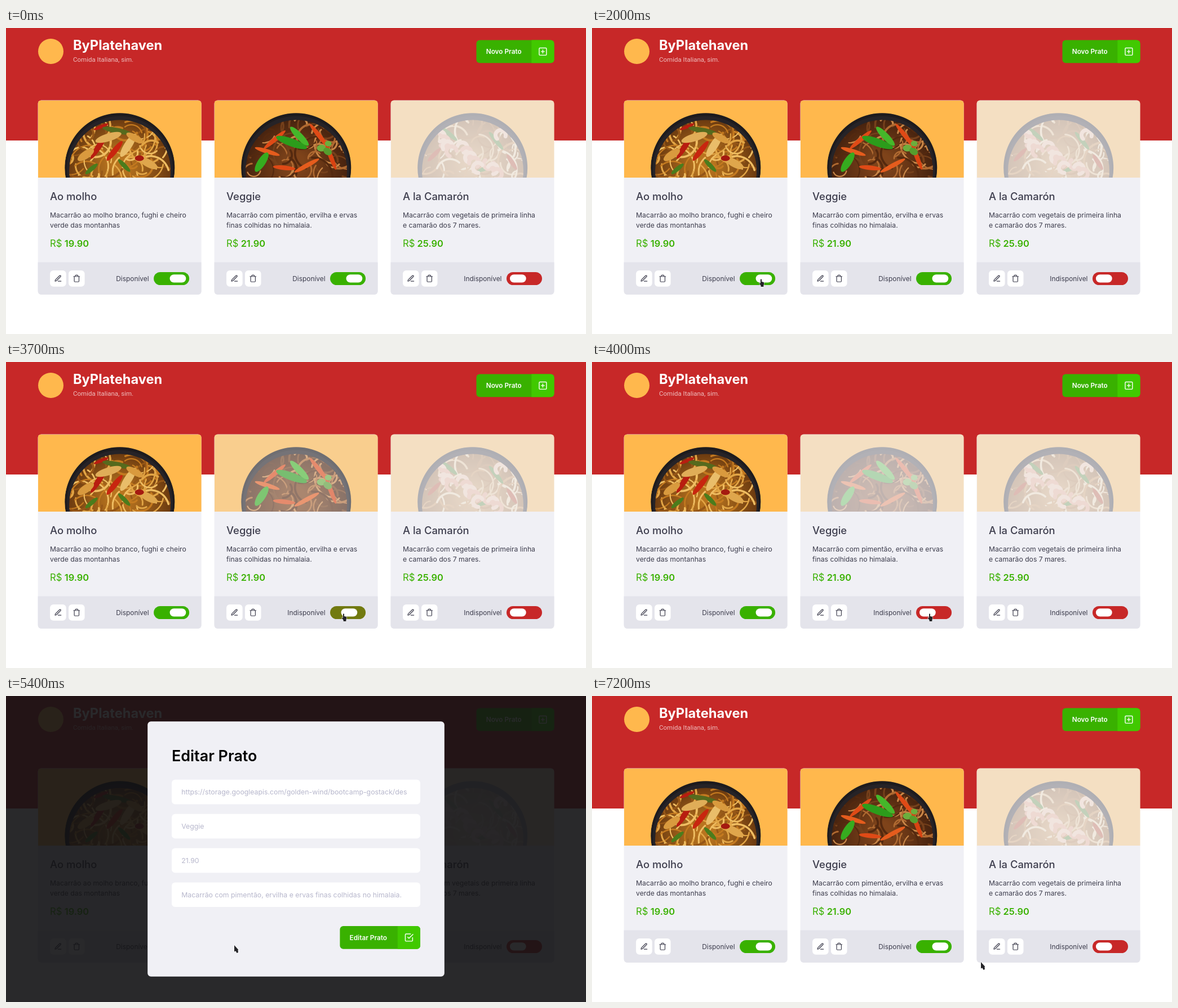
Animation, 1029 px wide and 544 px high, one loop 8000 ms. Source, as an HTML page with a canvas:

```html
<!DOCTYPE html>
<html lang="pt-BR">
<head>
<meta charset="utf-8">
<title>Comida Italiana</title>
<style>
  html, body { margin: 0; width: 100%; height: 100%; overflow: hidden; background: #fff; }
  canvas { display: block; width: 1029px; height: 544px; }
</style>
</head>
<body>
<canvas id="stage"></canvas>
<script>
const W = 1029, H = 544, LOOP = 8000, STEP = 100;
const CARD_W = 290, CARD_GAP = 312.95, CARD_TOP = 128.5, PHOTO_H = 137.5;
const RED = '#c72828', GREEN = '#39b100', LIME = '#41c900', AMBER = '#ffb84d';
const INK = '#3d3d4d', PAPER = '#f0f0f5', FOOT = '#e4e4eb', HINT = '#b7b7cc';
const MODAL_OPEN = 5300, MODAL_CLOSE = 7000;

const canvas = document.getElementById('stage');
const ctx = canvas.getContext('2d');
const dpr = window.devicePixelRatio || 1;
canvas.width = W * dpr;
canvas.height = H * dpr;

const clamp = v => Math.max(0, Math.min(1, v));
const mix = (a, b, p) => a + (b - a) * p;

const icon = {
  edit: new Path2D('M12 20h9M16.5 3.5a2.12 2.12 0 0 1 3 3L7 19l-4 1 1-4z'),
  trash: new Path2D('M3 6h18M19 6v14a2 2 0 0 1-2 2H7a2 2 0 0 1-2-2V6m3 0V4a2 2 0 0 1 2-2h4a2 2 0 0 1 2 2v2'),
  plus: new Path2D('M5 3h14a2 2 0 0 1 2 2v14a2 2 0 0 1-2 2H5a2 2 0 0 1-2-2V5a2 2 0 0 1 2-2zM12 8v8M8 12h8'),
  check: new Path2D('M9 11l3 3L22 4M21 12v7a2 2 0 0 1-2 2H5a2 2 0 0 1-2-2V5a2 2 0 0 1 2-2h11')
};

const pointer = {
  arrow: new Path2D('M0 0V11.5L2.4 10.2 4.6 14 7 12.8 6.4 8.8 7.4 8.2z'),
  hand: new Path2D('M2 1.2Q3 -.6 4 1.2V5L7.2 5.8Q8.6 6.4 8.2 9L7.4 11.5V14H2.6V12L.2 8.8Q-.4 7 1 7.2L2 8z'),
  beam: new Path2D('M1 1H3.5V12H1M6 1H3.5V12H6')
};

// Pieces: x, y, half length, half width, angle, colour
const dishes = [
  {
    name: 'Ao molho', price: '19.90',
    lines: ['Macarrão ao molho branco, fughi e cheiro', 'verde das montanhas'],
    base: ['#b8741f', '#6b3a10'], noodles: ['#e2a545', '#c47a20', '#955617', '#efbd62'],
    pieces: [
      [108, 82, 26, 5, -1, '#b81d10'], [136, 90, 22, 5, -.9, '#c8260f'], [112, 47, 14, 3, -.4, '#b81d10'],
      [140, 54, 26, 5, .2, '#566a1d'], [125, 66, 24, 7, -.3, '#e0ad58'], [160, 80, 24, 7, -1, '#e9bd6a'],
      [172, 67, 17, 6, .5, '#d99a3e'], [85, 97, 17, 7, -.6, '#d99a3e'], [196, 112, 18, 7, .5, '#dfa64c'],
      [153, 116, 15, 4, .8, '#4b7c1c'], [95, 122, 14, 4, -.7, '#4b7c1c'], [180, 103, 8, 5, 0, '#a51a10']
    ]
  },
  {
    name: 'Veggie', price: '21.90',
    lines: ['Macarrão com pimentão, ervilha e ervas', 'finas colhidas no himalaia.'],
    base: ['#7e431a', '#47230f'], noodles: ['#b06a31', '#75401b', '#c98748', '#54290f'],
    pieces: [
      [107, 70, 25, 4, -.7, '#df4a16'], [186, 63, 27, 4, .9, '#df4a16'], [94, 91, 23, 4, .3, '#e55c1d'],
      [164, 116, 25, 4, -.5, '#e55c1d'], [207, 101, 24, 4, 1.2, '#d94312'], [124, 120, 20, 4, .1, '#df4a16'],
      [137, 75, 29, 7, .35, '#2c9c1b'], [151, 64, 23, 6, .8, '#45b72a'], [84, 110, 20, 7, -1, '#36ab1f'],
      [190, 85, 8, 6, 0, '#6cae3d'], [201, 91, 8, 6, .6, '#569c2d'], [202, 77, 6, 5, 0, '#6cae3d']
    ]
  },
  {
    name: 'A la Camarón', price: '25.90',
    lines: ['Macarrão com vegetais de primeira linha', 'e camarão dos 7 mares.'],
    base: ['#cf9c5c', '#96642f'], noodles: ['#ecc78f', '#cd9654', '#f3dcb0', '#b27b40'],
    pieces: [
      [104, 60, 18, 4, .7, '#5d8a35'], [187, 72, 20, 4, .9, '#5d8a35'], [77, 97, 16, 4, -.8, '#b74a25'],
      [170, 120, 18, 4, -.4, '#5d8a35'], [215, 110, 16, 4, 1, '#b74a25']
    ],
    shrimps: 14
  }
];

function randomizer(seed) {
  return () => (seed = seed * 16807 % 2147483647) / 2147483647;
}

function paintPhoto(dish, seed) {
  const c = document.createElement('canvas');
  const scale = 2 * dpr, rnd = randomizer(seed);
  c.width = CARD_W * scale;
  c.height = Math.ceil(PHOTO_H * scale);
  const g = c.getContext('2d');
  const disc = (x, y, r, fill) => {
    g.beginPath();
    g.arc(x, y, r, 0, 7);
    g.fillStyle = fill;
    g.fill();
  };
  g.scale(scale, scale);
  g.fillStyle = AMBER;
  g.fillRect(0, 0, CARD_W, PHOTO_H + 1);
  disc(145.2, 120.2, 97.5, '#1d1b1e');
  disc(145.2, 122, 94, '#262327');
  const glow = g.createRadialGradient(145, 110, 15, 145, 126, 92);
  glow.addColorStop(0, dish.base[0]);
  glow.addColorStop(1, dish.base[1]);
  disc(145.5, 125, 90, glow);
  g.clip();
  g.lineCap = 'round';
  for (let i = 0; i < 80; i++) {
    const a = rnd() * 6.28;
    g.beginPath();
    g.arc(50 + rnd() * 190, 38 + rnd() * 105, 9 + rnd() * 26, a, a + 1.2 + rnd() * 1.6);
    g.lineWidth = 2 + rnd() * 1.8;
    g.strokeStyle = dish.noodles[i % 4];
    g.stroke();
  }
  for (const [x, y, rx, ry, angle, fill] of dish.pieces) {
    g.beginPath();
    g.ellipse(x, y, rx, ry, angle, 0, 7);
    g.fillStyle = fill;
    g.fill();
  }
  for (let i = 0; i < (dish.shrimps || 0); i++) {
    const a = rnd() * 6.28;
    g.beginPath();
    g.arc(80 + i * 47 % 134, 55 + i * 29 % 78, 9, a, a + 4.2);
    g.lineWidth = 7;
    g.strokeStyle = i % 2 ? '#f4cdad' : '#eaa985';
    g.stroke();
  }
  return c;
}

const photos = dishes.map((d, i) => paintPhoto(d, 311 + i * 97));

// Switch moves: start, duration, target state
const moves = [
  [[2230, 150, 0], [2700, 250, 1]],
  [[3600, 250, 0], [4100, 250, 1]],
  []
];

function switchState(i, t) {
  const state = { knob: i < 2 ? 1 : 0, on: i < 2 };
  state.fade = state.knob;
  for (const [start, span, to] of moves[i]) {
    if (t <= start) continue;
    const p = clamp((t - start) / span);
    state.knob = mix(1 - to, to, p);
    state.fade = mix(1 - to, to, clamp(p * 1.4));
    state.on = to === 1;
  }
  return state;
}

// Pointer route: time, x, y
const route = [
  [200, 106, 0], [400, 86, 60], [600, 56, 150], [800, 35, 240], [1000, 36, 323],
  [1200, 70, 430], [1400, 160, 504], [1600, 290, 492], [1700, 337, 470], [1800, 315, 451],
  [1900, 297, 446], [2900, 297, 446], [3200, 425, 445], [3500, 586, 447], [3600, 596, 447],
  [4400, 596, 447], [4500, 589, 446], [4600, 471, 477], [4800, 424, 463], [5100, 401, 443],
  [5200, 401, 443], [5300, 405, 443], [5600, 405, 443], [5900, 425, 330], [6200, 467, 148],
  [6300, 471, 240], [6500, 484, 495], [6600, 525, 488], [6800, 649, 436], [7000, 649, 436],
  [7200, 690, 473]
];

function pointerAt(t) {
  const i = route.findIndex(k => k[0] > t);
  if (i < 0) return route[route.length - 1].slice(1);
  const [t0, x0, y0] = route[i - 1], [t1, x1, y1] = route[i];
  const p = (t - t0) / (t1 - t0);
  return [mix(x0, x1, p), mix(y0, y1, p)];
}

const cardX = i => 56.6 + i * CARD_GAP;
const fieldY = i => 148.8 + i * 60.9;
const inside = (x, y, l, t, w, h) => x >= l && x <= l + w && y >= t && y <= t + h;

function pointerKind(x, y, t) {
  const hx = x + 3, hy = y + 1;
  if (t >= MODAL_OPEN && t < MODAL_CLOSE) {
    if (inside(hx, hy, 592, 409, 143, 41)) return 'hand';
    return [0, 1, 2, 3].some(i => inside(hx, hy + 5, 294, fieldY(i), 441, 43.5)) ? 'beam' : 'arrow';
  }
  const hot = dishes.some((d, i) =>
    inside(hx, hy, cardX(i) + 205.5, 434, 63, 23) || inside(hx, hy, cardX(i) + 21.5, 431, 62, 29));
  return t >= 2000 && hot ? 'hand' : 'arrow';
}

function box(x, y, w, h, r, fill) {
  ctx.beginPath();
  ctx.roundRect(x, y, w, h, r);
  ctx.fillStyle = fill;
  ctx.fill();
}

function text(str, x, y, size, color, weight = 400, align = 'left', family = 'Inter') {
  ctx.font = `${weight} ${size}px ${family}, sans-serif`;
  ctx.textAlign = align;
  ctx.fillStyle = color;
  ctx.fillText(str, x, y);
}

function glyph(path, cx, cy, size, color) {
  ctx.save();
  ctx.translate(cx - size / 2, cy - size / 2);
  ctx.scale(size / 24, size / 24);
  ctx.lineWidth = 2;
  ctx.lineCap = ctx.lineJoin = 'round';
  ctx.strokeStyle = color;
  ctx.stroke(path);
  ctx.restore();
}

function button(label, x, y, w, path) {
  const side = 40.2, h = 40.8;
  box(x, y, w, h, 6, GREEN);
  box(x + w - side, y, side, h, [0, 6, 6, 0], LIME);
  text(label, x + 17.2, y + 24.7, 11.8, '#fff', 600);
  glyph(path, x + w - side / 2, y + h / 2, 17.2, '#fff');
}

function drawHeader() {
  ctx.fillStyle = RED;
  ctx.fillRect(0, 0, W, 200);
  ctx.beginPath();
  ctx.arc(79.5, 41.5, 22.5, 0, 7);
  ctx.fillStyle = AMBER;
  ctx.fill();
  text('ByPlatehaven', 119, 39, 23.6, '#fff', 700);
  text('Comida Italiana, sim.', 119, 59.5, 11.5, 'rgba(255,255,255,.7)', 400, 'left', 'Roboto');
  button('Novo Prato', 834.5, 21.5, 138, icon.plus);
}

function drawCard(i, t) {
  const d = dishes[i], x = cardX(i), left = x + 21.5, s = switchState(i, t);
  box(x, CARD_TOP, CARD_W, 345.5, 6, PAPER);
  box(x, 416.6, CARD_W, 57.4, [0, 0, 6, 6], FOOT);

  ctx.save();
  ctx.beginPath();
  ctx.roundRect(x, CARD_TOP, CARD_W, PHOTO_H, [6, 6, 0, 0]);
  ctx.clip();
  ctx.globalAlpha = mix(.3, 1, s.fade);
  ctx.drawImage(photos[i], x, CARD_TOP, CARD_W, PHOTO_H);
  ctx.restore();

  text(d.name, left, 305.5, 18.4, INK, 500);
  d.lines.forEach((line, n) => text(line, left, 336.5 + n * 18.2, 12.2, INK));
  text('R$', left, 388.6, 16.6, GREEN);
  text(d.price, left + 25.6, 388.6, 16.4, GREEN, 600);

  box(left, 431, 28.6, 28.8, 6, '#fff');
  box(left + 32.9, 431, 28.6, 28.8, 6, '#fff');
  glyph(icon.edit, left + 14.3, 445.3, 14.3, INK);
  glyph(icon.trash, left + 47.2, 445.3, 14.3, INK);

  text(s.on ? 'Disponível' : 'Indisponível', x + 197, 449.6, 11.9, INK, 400, 'right');
  const rgb = [[199, 57], [40, 177], [40, 0]].map(([a, b]) => Math.round(mix(a, b, s.knob)));
  box(x + 205.5, 434, 63, 23, 11.5, `rgb(${rgb})`);
  box(x + 205.5 + mix(6, 28.5, s.knob), 438.2, 28.7, 14.4, 7.2, '#fff');
}

function drawModal() {
  ctx.fillStyle = 'rgba(18,18,20,.9)';
  ctx.fillRect(0, 0, W, H);
  box(251.2, 45.3, 526.6, 453.5, 6, PAPER);
  text('Editar Prato', 294, 116, 26.9, '#000', 600);
  const hints = [
    'https://storage.googleapis.com/golden-wind/bootcamp-gostack/des',
    dishes[1].name, dishes[1].price, dishes[1].lines.join(' ')
  ];
  hints.forEach((hint, i) => {
    const y = fieldY(i);
    box(294, y, 441, 43.6, 6, '#fff');
    text(hint, 311.2, y + 26.2, 12.3, HINT);
  });
  button('Editar Prato', 592.4, 409, 142.6, icon.check);
}

function drawPointer(t) {
  if (t < 200) return;
  const [x, y] = pointerAt(t), kind = pointerKind(x, y, t);
  ctx.save();
  ctx.translate(x, y);
  ctx.lineJoin = 'round';
  ctx.lineWidth = kind === 'beam' ? 1 : 1.2;
  ctx.strokeStyle = kind === 'beam' ? '#222' : 'rgba(255,255,255,.8)';
  ctx.stroke(pointer[kind]);
  ctx.fillStyle = '#232327';
  if (kind !== 'beam') ctx.fill(pointer[kind]);
  ctx.restore();
}

function render(now) {
  const t = Math.floor(now % LOOP / STEP) * STEP;
  ctx.setTransform(dpr, 0, 0, dpr, 0, 0);
  ctx.fillStyle = '#fff';
  ctx.fillRect(0, 0, W, H);
  drawHeader();
  dishes.forEach((d, i) => drawCard(i, t));
  if (t >= MODAL_OPEN && t < MODAL_CLOSE) drawModal();
  drawPointer(t);
}

const begin = performance.now();
function loop() {
  render(performance.now() - begin);
  requestAnimationFrame(loop);
}
loop();
</script>
</body>
</html>
```
